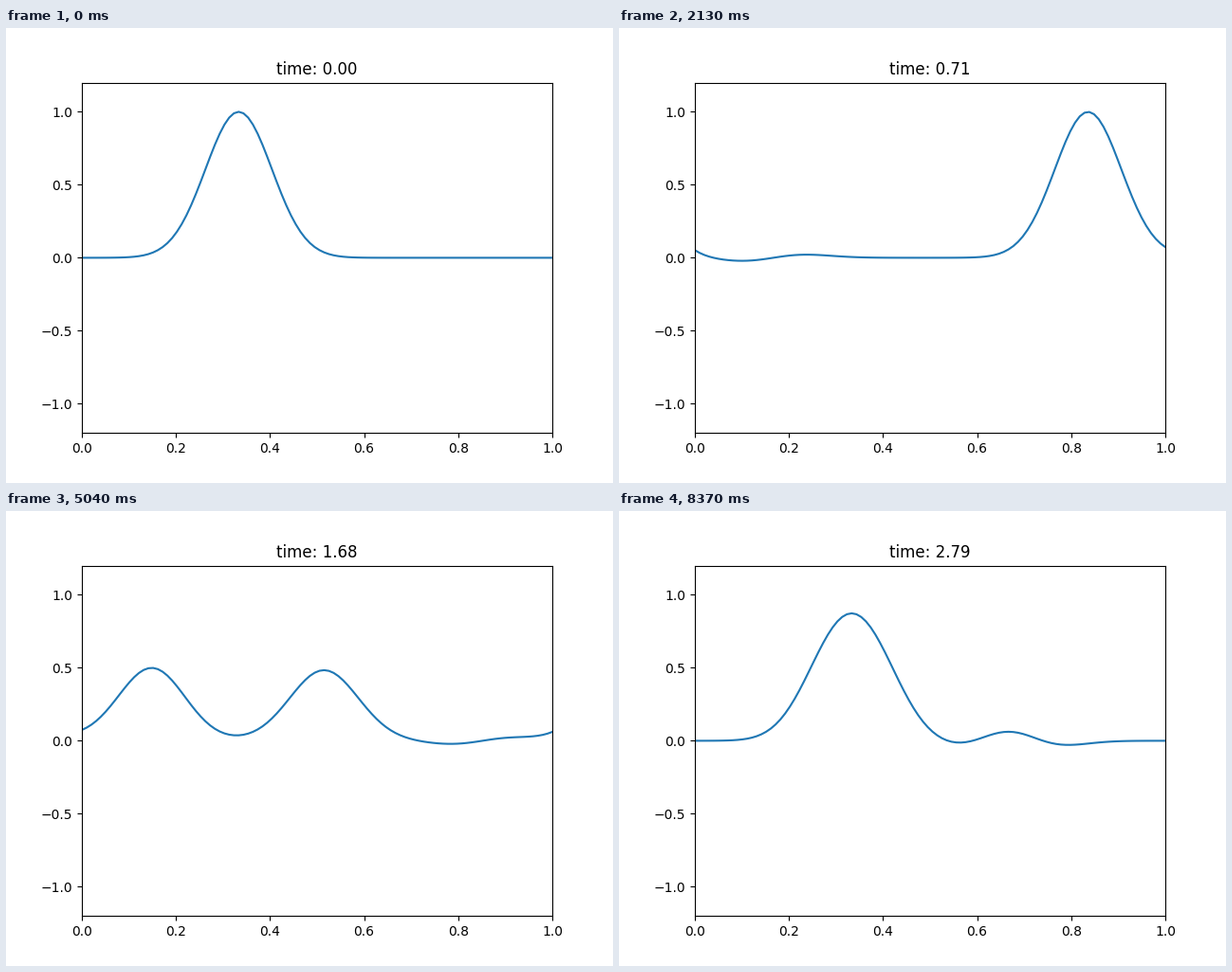
These frames come from a looping animation (640x480 px, 8.4 s). A matplotlib script:

```python
import numpy as np
import matplotlib.pyplot as plt
from matplotlib.animation import FuncAnimation

FRAMES = 280
DT = 0.01
POINTS = 100
C2 = 0.5  # wave speed squared

x = np.linspace(0, 1, POINTS)
courant2 = C2 * (DT / (x[1] - x[0])) ** 2

# The two ends of the ring carry half a cell each.
weight = np.full(POINTS, courant2)
weight[[0, -1]] *= 2


def curvature(u):
    return np.roll(u, 1) - 2 * u + np.roll(u, -1)


def solve():
    """Leapfrog the wave equation on a ring, starting from a bump at rest."""
    states = np.empty((FRAMES, POINTS))
    prev = u = np.exp(-100 * (x - 1 / 3) ** 2)
    for i in range(FRAMES):
        states[i] = u
        prev, u = u, 2 * u - prev + weight * curvature(u)
    return states


waves = solve()

fig, ax = plt.subplots(figsize=(6.4, 4.8), dpi=100)
ax.set_xlim(0, 1)
ax.set_ylim(-1.2, 1.2)
line, = ax.plot(x, waves[0])
title = ax.set_title("time: 0.00")


def update(i):
    line.set_ydata(waves[i])
    title.set_text(f"time: {i * DT:.2f}")
    return line, title


anim = FuncAnimation(fig, update, frames=FRAMES, interval=30,
                     repeat=True, repeat_delay=0, blit=False)
plt.show()
```
